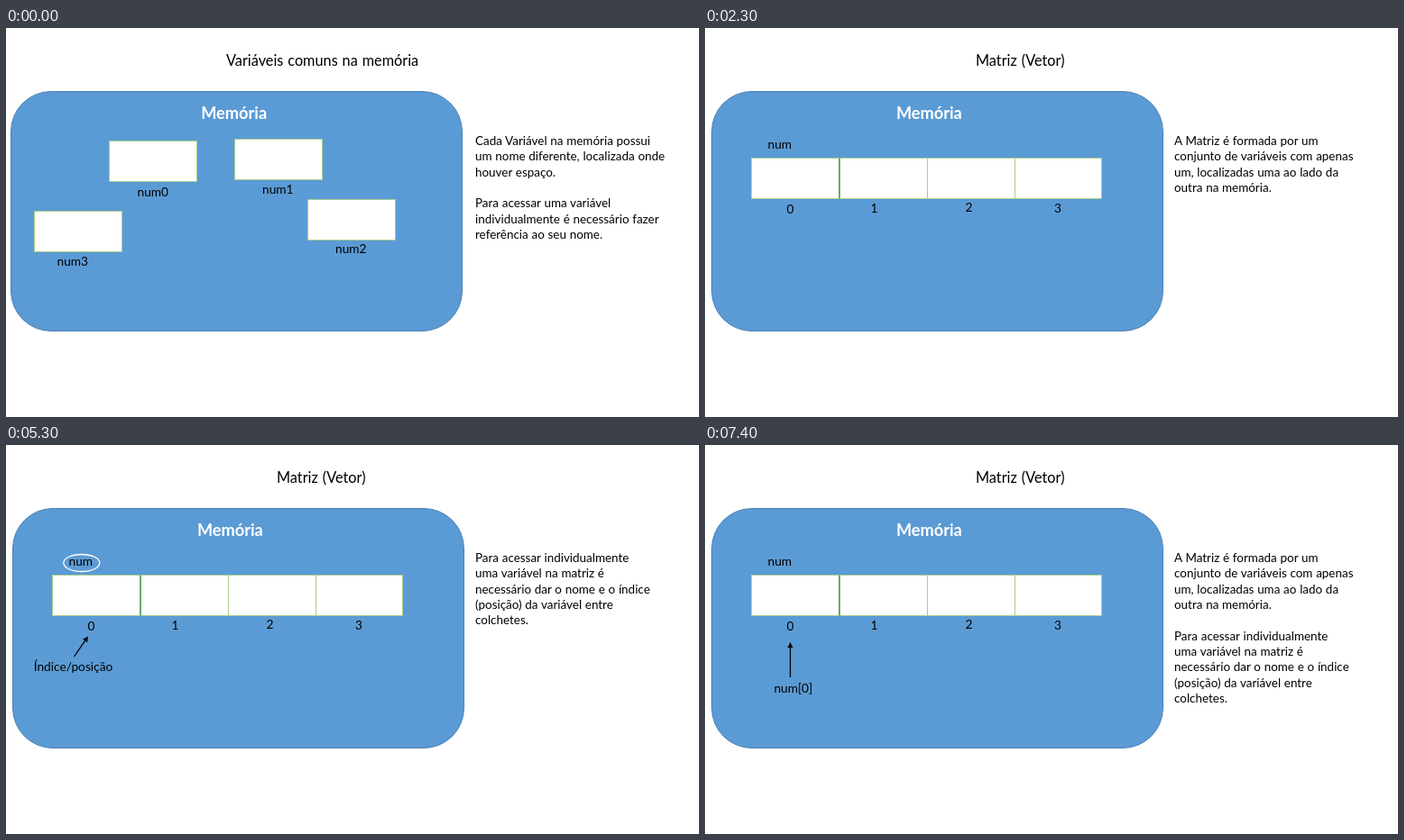
An HTML page for the animation above (8000 ms loop, 768 by 432 pixels).

```html
<!DOCTYPE html>
<html lang="pt">
<head>
<meta charset="utf-8">
<title>Variáveis e matriz na memória</title>
<style>
html, body { margin: 0; width: 100%; height: 100%; overflow: hidden; background: #fff; }
svg { display: block; width: 768px; height: 432px; font-family: Lato, "Open Sans", sans-serif; }
.title { font-size: 16.3px; word-spacing: .7px; }
.head { font-size: 18.2px; font-weight: 700; fill: #fff; }
.label { font-size: 13.7px; }
.body { font-size: 13.45px; word-spacing: .3px; }
.box { fill: #fff; stroke: #a9cd8e; }
.arrow { stroke: #000; stroke-width: 1.3; }
</style>
</head>
<body>
<svg id="stage" viewBox="0 0 768 432"></svg>
<script>
const stage = document.getElementById('stage');
const LOOP = 8000, LINE = 17.33;

const text = (cls, x, y, s) => `<text class="${cls}" x="${x}" y="${y}">${s}</text>`;
const label = (x, y, s) => text('label', x, y, s);
const box = (x, y, w = 97) => `<rect class="box" x="${x}" y="${y}" width="${w}" height="45"/>`;
const body = lines => lines.map((s, i) => s && text('body', 520, 130 + i * LINE, s)).join('');
const panel = x => `<rect x="${x}" y="70.5" width="500" height="266" rx="44.5" fill="#5b9bd5" stroke="#4a80b3"/>`;

// Shaft from (x1,y1) to the tip (x2,y2), with a filled head
function arrow(x1, y1, x2, y2) {
  const len = Math.hypot(x2 - x1, y2 - y1);
  const ux = (x2 - x1) / len, uy = (y2 - y1) / len;
  const bx = x2 - ux * 6, by = y2 - uy * 6;
  return `<line class="arrow" x1="${x1}" y1="${y1}" x2="${bx}" y2="${by}"/>` +
    `<path d="M${x2} ${y2}L${bx - uy * 3} ${by + ux * 3}L${bx + uy * 3} ${by - ux * 3}Z"/>`;
}

const about = [
  'A Matriz é formada por um',
  'conjunto de variáveis com apenas',
  'um, localizadas uma ao lado da',
  'outra na memória.'
];
const access = [
  'Para acessar individualmente',
  'uma variável na matriz é',
  'necessário dar o nome e o índice',
  '(posição) da variável entre',
  'colchetes.'
];

const common =
  text('title', 244, 42, 'Variáveis comuns na memória') +
  panel(5.5) + text('head', 216.2, 100.5, 'Memória') +
  box(114.5, 125.5) + box(253.5, 123.5) + box(334.5, 190.5) + box(31.5, 203.5) +
  label(145.5, 187, 'num0') + label(284, 184, 'num1') +
  label(365, 249.5, 'num2') + label(56.5, 264, 'num3') +
  body([
    'Cada Variável na memória possui',
    'um nome diferente, localizada onde',
    'houver espaço.',
    '',
    'Para acessar uma variável',
    'individualmente é necessário fazer',
    'referência ao seu nome.'
  ]);

const matrix =
  text('title', 300, 42, 'Matriz (Vetor)') +
  panel(7.5) + text('head', 211.9, 100.5, 'Memória') +
  label(69.5, 133.5, 'num') +
  box(51.5, 144.5) + box(149.5, 144.5) + box(246.5, 144.5) + box(343.5, 144.5, 96) +
  '<path d="M149 144.5V189.5" stroke="#6aaa6a" stroke-width="2"/>' +
  label(90.5, 205.5, 0) + label(183.5, 205, 1) + label(288.5, 204, 2) + label(387, 204.5, 3);

const scenes = [
  [0, common],
  [500, matrix + body(about)],
  [3500, matrix + body(access) +
    '<ellipse cx="83.8" cy="131" rx="20" ry="9.5" fill="none" stroke="#fff" stroke-width="1.3"/>' +
    arrow(75.5, 235, 91, 212.5) + label(30.7, 251, 'Índice/posição')],
  [6500, matrix + body([...about, '', ...access]) +
    arrow(94.5, 258, 94.5, 219) + label(76.4, 274.5, 'num[0]')]
];

let shown = null;
function draw(now) {
  const t = now % LOOP;
  const scene = scenes.filter(s => s[0] <= t).pop();
  if (scene !== shown) {
    shown = scene;
    stage.innerHTML = scene[1];
  }
}

const start = performance.now();
function tick() {
  draw(performance.now() - start);
  requestAnimationFrame(tick);
}
tick();
</script>
</body>
</html>
```
